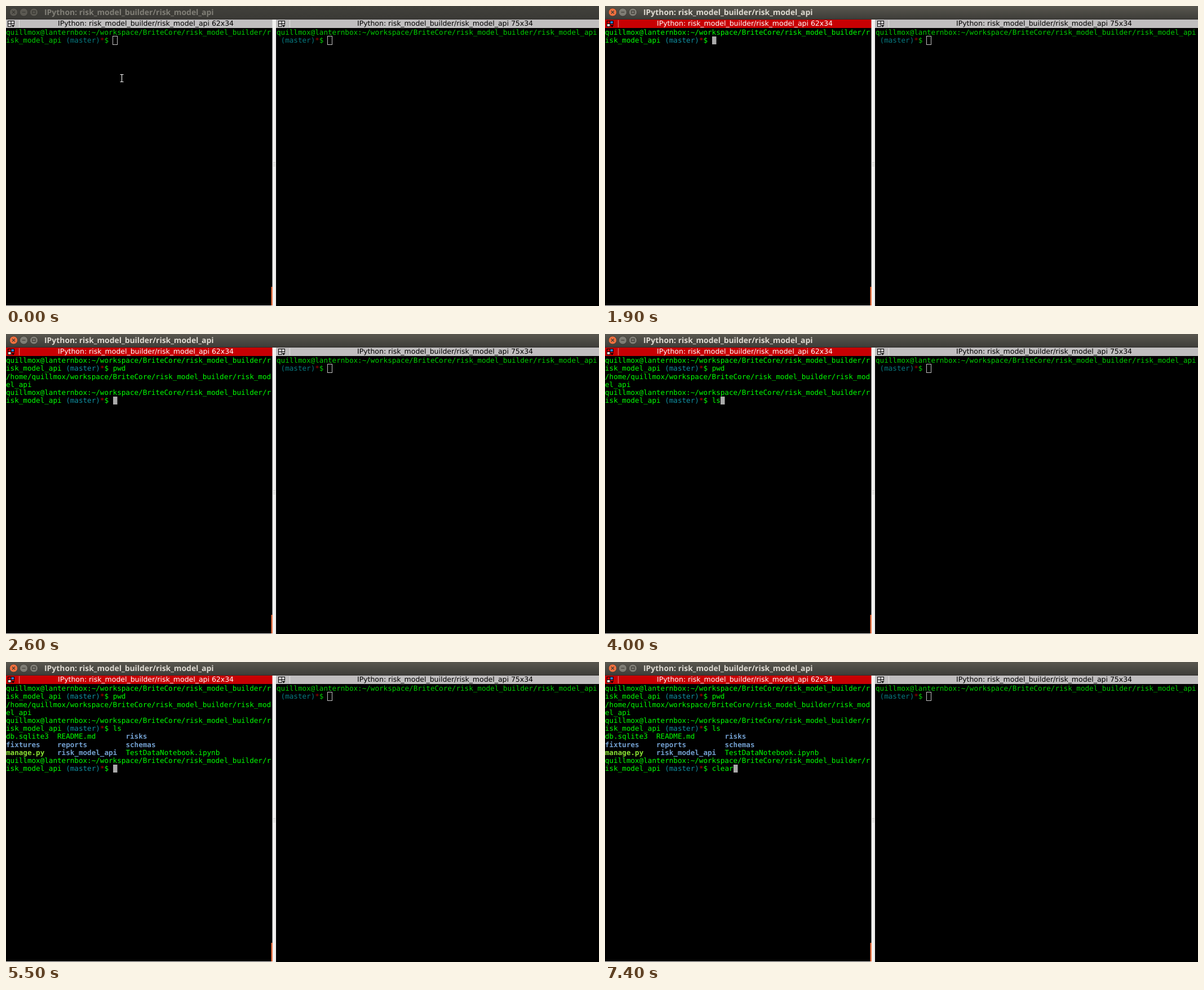
These frames come from a looping animation (1052x532 px, 8000 ms). An HTML page with a canvas:

```html
<!DOCTYPE html>
<html lang="en">
<head>
<meta charset="utf-8">
<title>Terminal session</title>
<style>
html, body { margin: 0; width: 100%; height: 100%; overflow: hidden; background: #000; }
canvas { display: block; }
</style>
</head>
<body>
<canvas id="stage" width="1052" height="532"></canvas>
<script>
const ctx = document.getElementById('stage').getContext('2d');
ctx.textRendering = 'geometricPrecision';
const LOOP = 8000, CELL_W = 7.586, CELL_H = 14.22, TOP = 39.8;
const MONO = '12.6px "DejaVu Sans Mono", monospace';
const TITLE = 'IPython: risk_model_builder/risk_model_api';
const USER = 'quillmox';
const PATH = '/workspace/BriteCore/risk_model_builder/risk_model_api';
const PROMPT = `${USER}@lanternbox:~${PATH}`;

const BRIGHT = { text: '#00ff00', branch: '#0f91a2', star: '#cc0000', dir: '#729fcf', exec: '#8ae234' };
const DIM = { text: '#00cc00', branch: '#067a80', star: '#a80000' };

const FILES = [
  [[0, 'db.sqlite3', 'text'], [12, 'README.md', 'text'], [28, 'risks', 'dir']],
  [[0, 'fixtures', 'dir'], [12, 'reports', 'dir'], [28, 'schemas', 'dir']],
  [[0, 'manage.py', 'exec'], [12, 'risk_model_api', 'dir'], [28, 'TestDataNotebook.ipynb', 'text']],
];

// [start ms, commands already run, current input, cursor visible]
const STEPS = [
  [0, 0, '', true], [900, 0, '', false], [1500, 0, '', true],
  [2000, 0, 'p', true], [2100, 0, 'pw', true], [2300, 0, 'pwd', true],
  [2600, 1, '', true], [3200, 1, '', false], [3700, 1, '', true],
  [3900, 1, 'l', true], [4000, 1, 'ls', true],
  [4300, 2, '', true], [4900, 2, '', false], [5500, 2, '', true], [6100, 2, '', false],
  [6600, 2, 'ls', true], [7000, 2, 'pwd', true], [7400, 2, 'clear', true],
];

function rect(x, y, w, h, color) {
  ctx.fillStyle = color;
  ctx.fillRect(x, y, w, h);
}

function text(str, x, y, font, color) {
  ctx.font = font;
  ctx.fillStyle = color;
  ctx.fillText(str, x, y);
}

function line(color, width, ...points) {
  ctx.strokeStyle = color;
  ctx.lineWidth = width;
  ctx.beginPath();
  for (let i = 0; i < points.length; i += 4) {
    ctx.moveTo(points[i], points[i + 1]);
    ctx.lineTo(points[i + 2], points[i + 3]);
  }
  ctx.stroke();
}

function titleBar(focused) {
  const fade = ctx.createLinearGradient(0, 0, 0, 24);
  fade.addColorStop(0, focused ? '#59574f' : '#42413c');
  fade.addColorStop(1, focused ? '#3d3c38' : '#3a3935');
  rect(0, 0, 1052, 24, fade);
  rect(0, 23, 1052, 1, '#2f2e2b');
  const glyph = focused ? '#3c3a35' : '#383732';
  [13.5, 31.5, 49.5].forEach((x, i) => {
    ctx.beginPath();
    ctx.arc(x, 11, 7.1, 0, 7);
    ctx.fillStyle = !focused ? '#5b5952' : i ? '#7f7d75' : '#f0703f';
    ctx.fill();
    ctx.strokeStyle = '#353430';
    ctx.lineWidth = 0.7;
    ctx.stroke();
  });
  line(glyph, 1.2, 11, 8.5, 16, 13.5, 16, 8.5, 11, 13.5);
  line(glyph, 1.2, 28.5, 11, 34.5, 11);
  ctx.strokeRect(47, 8.6, 5, 4.8);
  text(TITLE, 68, 16, 'bold 13.9px "Open Sans", sans-serif', focused ? '#dfdbd2' : '#817f77');
}

function paneHeader(x, width, titleX, size, active) {
  rect(x, 24, width, 15, active ? '#c80003' : '#c0bebf');
  rect(x + 3, 26, 12, 11, '#000');
  const tiles = active ? ['#c80003', '#2c7fd0', '#e4e2e2', '#c80003'] : Array(4).fill('#d0cecf');
  tiles.forEach((color, i) => rect(x + 4 + i % 2 * 5.5, 27 + (i >> 1) * 5, 4.5, 4, color));
  rect(x + 9.5, 33, 6, 5, active ? '#c80003' : '#c0bebf');
  ctx.fillStyle = '#000';
  ctx.beginPath();
  ctx.moveTo(x + 9.5, 34);
  ctx.lineTo(x + 15.5, 34);
  ctx.lineTo(x + 12.5, 37.5);
  ctx.fill();
  rect(x + 23, 25, 1, 13, active ? '#e58081' : '#e4e2e2');
  text(`${TITLE} ${size}`, titleX, 35, '12.48px "DejaVu Sans", sans-serif', active ? '#fff' : '#000');
}

function cell(str, x, row, col, color, bold) {
  text(str, x + col * CELL_W, TOP + row * CELL_H + 11.3, (bold ? 'bold ' : '') + MONO, color);
}

// Prints text hard-wrapped at the pane width; returns the position after it.
function wrap(str, x, row, cols, color) {
  for (; str.length > cols; str = str.slice(cols), row++) cell(str.slice(0, cols), x, row, 0, color);
  cell(str, x, row, 0, color);
  return str.length === cols ? [row + 1, 0] : [row, str.length];
}

function prompt(x, startRow, cols, colors, input = '') {
  const [row, col] = wrap(PROMPT, x, startRow, cols, colors.text);
  cell('(master)', x, row, col + 1, colors.branch);
  cell('*', x, row, col + 9, colors.star);
  cell('$ ' + input, x, row, col + 10, colors.text);
  return [row, col + 12 + input.length];
}

function cursor(x, [row, col], filled) {
  const left = Math.round(x + col * CELL_W), top = Math.round(TOP + row * CELL_H);
  if (filled) return rect(left, top, 7.5, 14, '#aaa');
  ctx.strokeStyle = '#c4c4c4';
  ctx.lineWidth = 1;
  ctx.strokeRect(left - 0.5, top - 0.5, 8, 15);
}

function leftPane(t, focused) {
  const colors = focused ? BRIGHT : DIM;
  const [, done, input, visible] = STEPS.findLast(step => step[0] <= t);
  let row = 0;
  if (done > 0) {
    prompt(0, 0, 62, colors, 'pwd');
    wrap(`/home/${USER}${PATH}`, 0, 2, 62, colors.text);
    row = 4;
  }
  if (done > 1) {
    prompt(0, 4, 62, colors, 'ls');
    FILES.forEach((files, i) => files.forEach(([col, name, kind]) =>
      cell(name, 0, 6 + i, col, colors[kind], kind !== 'text')));
    row = 9;
  }
  const end = prompt(0, row, 62, colors, input);
  if (visible) cursor(0, end, focused);
}

function draw(t) {
  const focused = t >= 300;
  rect(0, 0, 1052, 532, '#000');
  titleBar(focused);
  paneHeader(0, 473, 92, '62x34', focused);
  paneHeader(480, 572, 623, '75x34', false);
  rect(472.5, 24, 6.5, 508, '#f2f1f0');
  rect(479, 24, 1, 15, '#c0bebf');
  rect(0, 531, 473, 1, '#f2f1f0');
  for (let y = 277; y < 284; y += 3) rect(474, y, 4, 1, '#cfcdca');
  rect(470.5, 498, 2.5, 33, '#f07746');
  leftPane(t, focused);
  cursor(480, prompt(480, 0, 75, DIM), false);
  if (t < 1900) {
    line('#fff', 1.1, 205.5, 122, 205.5, 134, 202.5, 121.5, 208.5, 121.5, 202.5, 134.5, 208.5, 134.5);
  }
}

function tick() {
  draw(performance.now() % LOOP);
  requestAnimationFrame(tick);
}
tick();
</script>
</body>
</html>
```
